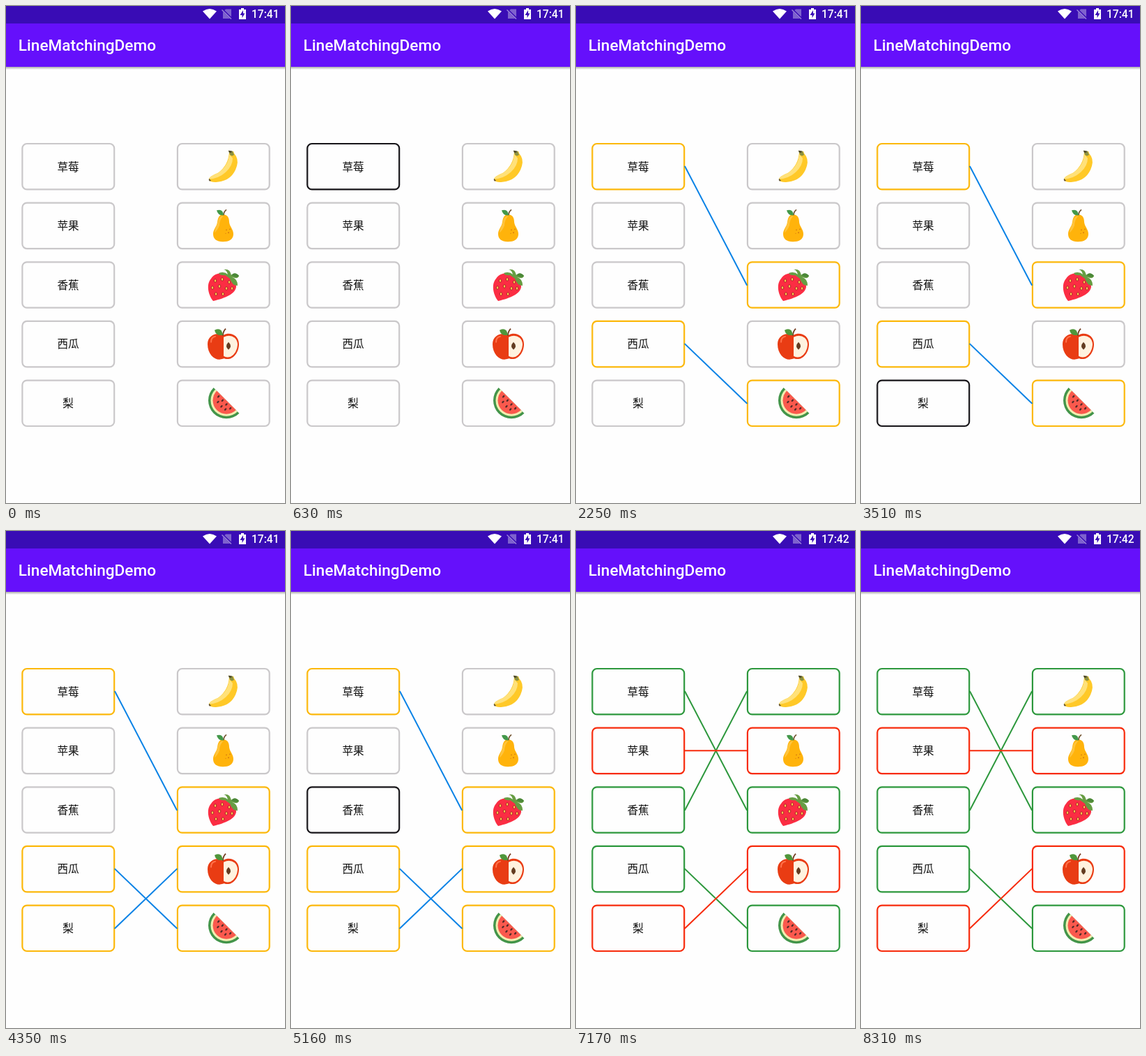
Recreate the animation shown at these times as an HTML page. Size 400x711 px, loop 8.34 s.

```html
<!DOCTYPE html>
<html lang="zh-CN">
<head>
<meta charset="utf-8">
<title>LineMatchingDemo</title>
<style>
  html, body { margin: 0; width: 100%; height: 100%; overflow: hidden; background: #fefefe; }
  svg { display: block; width: 100%; height: 100%; }
  .latin { font-family: Roboto, sans-serif; font-weight: 500; fill: #fff; }
  .word { font: 15.6px "Noto Sans CJK SC", "Noto Sans CJK", sans-serif; text-anchor: middle; fill: #101010; }
  .box { fill: #fefefe; stroke-width: 2.2; }
  .link { stroke-width: 2; stroke-linecap: round; }
</style>
</head>
<body>
<svg viewBox="0 0 400 711" preserveAspectRatio="none">
  <defs>
    <linearGradient id="shade" x2="0" y2="1">
      <stop stop-color="#aaa"/><stop offset="1" stop-color="#fefefe"/>
    </linearGradient>
    <g id="banana">
      <path d="M8-21 Q7-2-8 9Q-21 14-21 19Q-18 23-9 22Q13 20 19-1Q22-11 15-19L14-22Z" fill="#ffc928"/>
      <path d="M8-18Q7-1-8 9Q-21 14-21 18Q-7 17 3 8Q13-1 13-12Z" fill="#ffe179"/>
      <path d="M7-23L13-22L15-17Q12-14 9-17Z" fill="#8c9140"/>
      <path d="M7-23L12-22L11-20L8-20Z" fill="#4c4528"/>
      <path d="M-21 17L-18 20L-20 21Q-22 19-21 17" fill="#61502b"/>
    </g>
    <g id="pear">
      <path d="M-1-16C6-16 8-11 8-5C9 2 14 5 14 12C14 20 7 23-1 23C-10 23-15 19-15 12C-15 5-10 2-9-5C-8-12-6-16-1-16Z" fill="#ffb30b"/>
      <path d="M-9-3Q-7-15 0-14Q-6-9-6 0Q-9 7-13 10Q-12 3-9-3" fill="#ffc43c"/>
      <path d="M0-15Q0-20 4-23" fill="none" stroke="#70502c" stroke-width="1.6"/>
      <path d="M-10-22Q-1-25 0-15Q-8-14-10-22" fill="#43984a"/>
      <g fill="#d87c10"><circle cx="4" cy="6" r=".9"/><circle cx="9" cy="5" r=".9"/><circle cx="7" cy="10" r="1"/><circle cx="3" cy="11" r=".7"/></g>
    </g>
    <g id="strawberry">
      <path d="M-18-9C-13-17-4-18 2-14C9-14 18-7 18 2C18 12 3 19-15 23C-21 16-26 0-18-9Z" fill="#fb2d43"/>
      <path d="M2-14Q-5-13-7-17Q1-20 6-15Q4-22 0-22Q9-24 11-14Q17-19 22-13Q21-8 12-11Q20-9 20 1Q12 1 9-9Z" fill="#669d43"/>
      <path d="M11-14Q16-20 22-13Q19-9 11-14" fill="#4b8838"/>
      <g id="seeds"></g>
    </g>
    <g id="apple">
      <path d="M0-13C-11-18-23-12-23 0C-23 14-14 22-6 22C-2 22 0 20 2 21C13 24 22 12 22 0C22-13 9-18 0-13Z" fill="#e93c13"/>
      <path d="M0-10Q9-14 16-9Q20-5 20 1Q19 13 10 18Q4 20 0 17Z" fill="#fff2df"/>
      <path d="M-18-3Q-18-10-12-11" fill="none" stroke="#ff714a" stroke-width="2" stroke-linecap="round"/>
      <path d="M7-3Q13 3 7 8Q1 3 7-3" fill="#633b20"/>
      <path d="M-1-12Q-1-18 3-22" fill="none" stroke="#753d22" stroke-width="1.8"/>
      <path d="M-13-20Q-3-25-1-13Q-11-11-13-20" fill="#4f963b"/>
    </g>
    <g id="watermelon" transform="translate(4 -4) rotate(45)">
      <path d="M-26 0A26 26 0 0 0 26 0Z" fill="#43954a"/>
      <path d="M-22.5 0A22.5 22.5 0 0 0 22.5 0Z" fill="#f2edb0"/>
      <path d="M-19.5 0A19.5 19.5 0 0 0 19.5 0Z" fill="#fa594d"/>
      <g id="pips" fill="#522b29"></g>
    </g>
  </defs>

  <rect width="400" height="711" fill="#fefefe"/>
  <rect y="87" width="400" height="4" fill="url(#shade)"/>
  <rect width="400" height="87" fill="#6510fb"/>
  <rect width="400" height="25" fill="#390cb5"/>
  <path d="M282 7.5Q292 .5 302 7.5L292 18.5Z" fill="#fff"/>
  <path d="M315 4.5H323V18H311V8.5Z" fill="#7e62ce"/>
  <path d="M309.5 4.5L324 18.5" stroke="#390cb5" stroke-width="3"/>
  <path d="M309.5 5.5L323 18.5" stroke="#9e88dc" stroke-width="1.3"/>
  <path d="M334 5H337V3H341V5H344V19H334Z" fill="#fff"/>
  <path d="M340 6L335.5 13H338.5V17L342.5 10.5H340Z" fill="#390cb5"/>
  <text id="clock" class="latin" x="352" y="17" font-size="15.6"></text>
  <text class="latin" x="17.8" y="64" font-size="22.6">LineMatchingDemo</text>
  <g id="board"></g>
</svg>
<script>
const LOOP = 8340;
const CHECK_AT = 6810, MINUTE_AT = 6000;
const COLORS = { idle: "#cac8ca", active: "#171519", paired: "#fcb80b", link: "#0b83e6", right: "#2d983d", wrong: "#f72b0c" };
const words = ["草莓", "苹果", "香蕉", "西瓜", "梨"];
const fruits = ["banana", "pear", "strawberry", "apple", "watermelon"];
const pairs = [
  { from: 0, to: 2, pick: 420, join: 990, right: true },
  { from: 3, to: 4, pick: 1470, join: 1860, right: true },
  { from: 4, to: 3, pick: 3000, join: 3900, right: false },
  { from: 2, to: 0, pick: 4620, join: 5400, right: true },
  { from: 1, to: 1, pick: 5820, join: 6300, right: false }
];
const byId = id => document.getElementById(id);
const board = byId("board"), clock = byId("clock");
const rowY = row => 229.7 + row * 84.65;

function add(parent, tag, attrs, text = "") {
  const node = document.createElementNS("http://www.w3.org/2000/svg", tag);
  for (const key in attrs) node.setAttribute(key, attrs[key]);
  node.textContent = text;
  parent.appendChild(node);
  return node;
}

function addBox(x, row) {
  return add(board, "rect", { class: "box", x, y: rowY(row) - 32.7, width: 131.8, height: 65.4, rx: 6.5 });
}

for (const [x, y] of [[-12, -6], [-2, -8], [8, -4], [-16, 4], [-6, 2], [4, 5], [12, 5], [-11, 13], [-1, 13]]) {
  add(byId("seeds"), "ellipse", { cx: x, cy: y, rx: 1.8, ry: 2.3, fill: "#ffc84a", stroke: "#a51c2b", "stroke-width": .9 });
}
for (const [x, y] of [[-12, 4], [-4, 4], [4, 4], [12, 4], [-7, 10], [1, 11], [8, 10]]) {
  add(byId("pips"), "ellipse", { cx: x, cy: y, rx: 1.2, ry: 2.1 });
}

const leftBoxes = words.map((word, row) => {
  const box = addBox(23.4, row);
  add(board, "text", { class: "word", x: 89, y: rowY(row) + 5.8 }, word);
  return box;
});
const rightBoxes = fruits.map((fruit, row) => {
  const box = addBox(245.9, row);
  add(board, "use", { href: "#" + fruit, x: 312, y: rowY(row) });
  return box;
});
for (const pair of pairs) {
  pair.line = add(board, "line", { class: "link", x1: 156.3, y1: rowY(pair.from), x2: 244.8, y2: rowY(pair.to) });
}

function render(time) {
  const checked = time >= CHECK_AT;
  clock.textContent = time < MINUTE_AT ? "17:41" : "17:42";
  for (const { from, to, pick, join, right, line } of pairs) {
    const joined = time >= join;
    const verdict = right ? COLORS.right : COLORS.wrong;
    const pairedColor = checked ? verdict : COLORS.paired;
    leftBoxes[from].setAttribute("stroke", joined ? pairedColor : time >= pick ? COLORS.active : COLORS.idle);
    rightBoxes[to].setAttribute("stroke", joined ? pairedColor : COLORS.idle);
    line.setAttribute("stroke", checked ? verdict : COLORS.link);
    line.setAttribute("visibility", joined ? "visible" : "hidden");
  }
}

const start = performance.now();
function tick() {
  render((performance.now() - start) % LOOP);
  requestAnimationFrame(tick);
}
tick();
</script>
</body>
</html>
```
